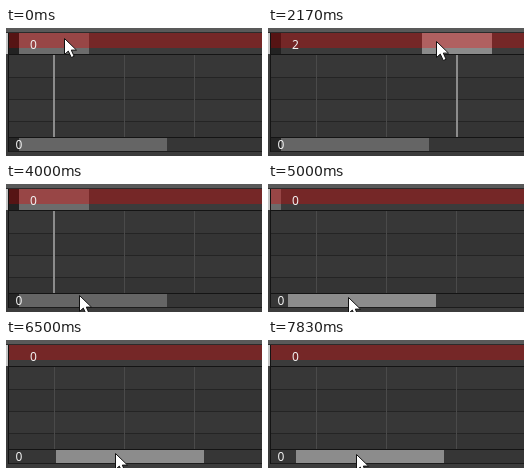
An HTML page for the animation above (8 s loop, 256 px wide and 128 px high).

```html
<!DOCTYPE html>
<html lang="en">
<head>
<meta charset="utf-8">
<title>Timeline scrubbing</title>
<style>
  html, body { margin: 0; width: 100%; height: 100%; overflow: hidden; background: #3a3a3a; }
  svg { display: block; width: 100vw; height: 100vh; }
  text { font: 12px "Noto Sans", "Open Sans", sans-serif; fill: #f2f2f2; }
</style>
</head>
<body>
<svg viewBox="0 0 256 128" shape-rendering="crispEdges">
  <defs><clipPath id="view"><rect x="3" y="0" width="253" height="128"/></clipPath></defs>
  <rect width="256" height="128" fill="#3c3c3c"/>
  <rect width="256" height="4" fill="#595959"/>
  <rect y="4" width="256" height="1" fill="#2b2b2b"/>
  <rect y="5" width="2" height="21" fill="#c4c4c4"/>

  <g clip-path="url(#view)">
    <rect x="3" y="5" width="253" height="15" fill="#752727"/>
    <rect x="3" y="20" width="253" height="6" fill="#3b3b3b"/>
    <g id="cell">
      <rect id="cellTop" y="5" width="70" height="15"/>
      <rect id="cellBase" y="20" width="70" height="6"/>
    </g>
    <g id="margin">
      <rect x="3" y="5" width="10" height="15" fill="#561414"/>
      <rect x="3" y="20" width="10" height="6" fill="#222"/>
    </g>
    <g id="rows"></g>
    <rect id="playhead" y="27" width="2" height="82" fill="#8c8c8c"/>
  </g>

  <rect x="2" y="26" width="254" height="1" fill="#141414"/>
  <rect x="2" y="109" width="254" height="1" fill="#141414"/>
  <rect x="3" y="110" width="253" height="13" fill="#363636"/>
  <rect id="gutter" x="3" y="110" width="10" height="13" fill="#262626"/>
  <rect id="thumb" y="110" width="148" height="13"/>
  <rect x="2" y="123" width="254" height="1" fill="#1c1c1c"/>
  <rect x="2" y="5" width="1" height="119" fill="#141414"/>

  <text id="frame" x="24" y="21"></text>
  <text x="9.5" y="121">0</text>
  <path id="cursor" d="M0 0V16L3.8 12.6L6.8 19L9.6 17.8L6.8 11.6H12Z"
        fill="#fff" stroke="#111" stroke-width="1" shape-rendering="geometricPrecision"/>
</svg>
<script>
const LOOP = 8000, RATE = 6;
const COL = 70.3, ORIGIN = 13, NOTCH = 7.4, GRAB = 73;
const RELEASE = 20, SCROLL = 28;

// Pointer path: step, x, y
const path = [
  [0, 58, 10], [4, 58, 10], [5, 64, 12], [7, 108, 17], [10, 178, 14], [11, 178, 14],
  [12, 175, 13], [13, 168, 13], [17, 71, 18], [18, 62, 17], [21, 62, 17],
  [22, 66, 40], [23, 75, 88], [24, 73, 111], [25, 73, 111], [26, 73, 112], [27, 73, 112],
  [28, 74, 112], [30, 80, 113], [34, 102, 113], [36, 109, 113], [39, 109, 113],
  [41, 102, 113], [42, 102, 113], [47, 88, 114]
];

const $ = id => document.getElementById(id);
const set = (id, attrs) => {
  for (const key in attrs) $(id).setAttribute(key, attrs[key]);
};
const rect = (x, y, w, h, fill) =>
  `<rect x="${x}" y="${y}" width="${w}" height="${h}" fill="${fill}"/>`;

function buildRows() {
  let out = "";
  for (let i = 0; i < 4; i++) {
    const y = 27 + i * 22;
    out += rect(3, y, 253, Math.min(22, 109 - y), i % 2 ? "#343434" : "#373737");
  }
  for (let y = 49; y < 109; y += 22) out += rect(3, y, 253, 1, "#242424");
  for (let x = 48; x < 256; x += 70) out += rect(x, 27, 1, 82, "#4a4a4a");
  $("rows").innerHTML = out;
}

function pointer(step) {
  const i = path.findIndex(p => p[0] >= step);
  const b = path[i], a = path[Math.max(0, i - 1)];
  const u = b === a ? 0 : (step - a[0]) / (b[0] - a[0]);
  return [1, 2].map(k => Math.round(a[k] + (b[k] - a[k]) * u));
}

function draw(ms) {
  const step = Math.floor((ms + 4) * RATE / 1000) % (LOOP * RATE / 1000);
  const [x, y] = pointer(step);
  const pressed = step >= 5 && step < RELEASE;
  const scrolling = step >= SCROLL;
  const frame = pressed ? Math.floor((x - ORIGIN) / COL) : 0;
  const scroll = scrolling ? Math.round((x - GRAB) / NOTCH) : 0;
  const shift = Math.round((frame - scroll) * COL);
  const home = scroll ? "none" : "inline";

  set("cell", { transform: `translate(${ORIGIN + shift} 0)` });
  set("cellTop", { fill: pressed ? "#b06060" : "#984646" });
  set("cellBase", { fill: pressed ? "#8b8b8b" : "#6c6c6c" });
  set("playhead", { x: 47 + shift });
  set("margin", { display: home });
  set("gutter", { display: home });
  set("thumb", { x: ORIGIN + Math.round(scroll * NOTCH), fill: scrolling ? "#8c8c8c" : "#656565" });
  set("cursor", { transform: `translate(${x + 0.5} ${y + 0.5})` });
  $("frame").textContent = frame;
}

buildRows();
const start = performance.now();
function tick() {
  draw((performance.now() - start) % LOOP);
  requestAnimationFrame(tick);
}
tick();
</script>
</body>
</html>
```
